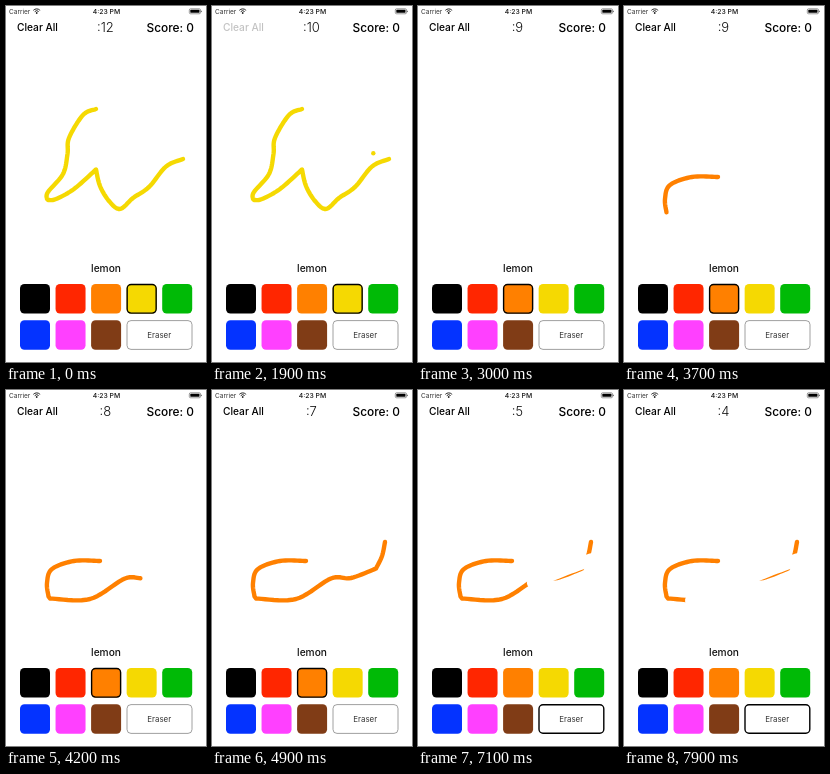
Animation, 200 px wide and 356 px high, one loop 8000 ms. Source, as an HTML page with a canvas:

```html
<!DOCTYPE html>
<html lang="en">
<head>
<meta charset="utf-8">
<title>Drawing game</title>
<style>
  html, body { margin: 0; width: 100%; height: 100%; overflow: hidden; background: #fff; }
  canvas { display: block; width: 100%; height: 100%; }
</style>
</head>
<body>
<canvas id="stage"></canvas>
<script>
const W = 200, H = 356, LOOP = 8000, STEP = 100;
const FONT = 'Inter, Roboto, sans-serif';
const ORANGE = '#ff8000', YELLOW = '#f5d902';
const SWATCHES = ['#000', '#ff2600', ORANGE, YELLOW, '#00ba06', '#0433ff', '#ff40ff', '#803c16'];

const canvas = document.getElementById('stage');
const ctx = canvas.getContext('2d');

// Smooth curve through a few points.
function smooth(points) {
  const out = [points[0]], last = points.length - 1;
  const at = k => points[Math.max(0, Math.min(last, k))];
  for (let i = 0; i < last; i++) {
    const [a, b, c, d] = [at(i - 1), at(i), at(i + 1), at(i + 2)];
    for (let n = 1; n <= 10; n++) {
      const f = n / 10;
      out.push([0, 1].map(k => b[k] + 0.5 * f * (c[k] - a[k] +
        f * (2 * a[k] - 5 * b[k] + 4 * c[k] - d[k] +
        f * (3 * (b[k] - c[k]) + d[k] - a[k])))));
    }
  }
  return out;
}

// Each argument is one smooth piece; pieces meet in corners.
function makeLine(...pieces) {
  const points = pieces.flatMap(smooth);
  const path = new Path2D();
  let length = 0;
  points.forEach(([x, y], i) => {
    path.lineTo(x, y);
    if (i) length += Math.hypot(x - points[i - 1][0], y - points[i - 1][1]);
  });
  return { path, length };
}

const yellowLine = makeLine(
  [[90, 103], [77, 109], [63, 132], [61.5, 148], [57, 168], [42, 186], [41, 193]],
  [[42, 194], [50, 193], [68, 183], [90, 163.5]],
  [[90, 163.5], [94, 180], [103, 195], [114, 203], [127, 192], [143, 181], [160, 160.5], [177, 153]]
);
const orangeLine = makeLine(
  [[94, 171], [68, 171], [46, 179], [41, 193], [42.5, 206.5]],
  [[44, 208.5], [84, 209], [119, 188.5], [139, 188], [164, 178.5]],
  [[164, 178.5], [170, 166], [173, 152]]
);
const longWipe = makeLine([[173, 169.8], [139, 182.4], [87, 205]]);
const shortWipe = makeLine([[82, 208], [67.5, 210.5]]);

const progress = (t, from, to) => Math.max(0, Math.min(1, (t - from) / (to - from)));

function stroke(line, part, color, width) {
  if (part <= 0) return;
  ctx.strokeStyle = color;
  ctx.lineWidth = width;
  ctx.lineCap = ctx.lineJoin = 'round';
  if (part < 1) ctx.setLineDash([line.length * part, line.length * 2]);
  ctx.stroke(line.path);
  ctx.setLineDash([]);
}

function dot(x, y, r, color) {
  ctx.beginPath();
  ctx.arc(x, y, r, 0, Math.PI * 2);
  ctx.fillStyle = color;
  ctx.fill();
}

function text(str, x, y, size, { weight = 400, align = 'left', color = '#000', alpha = 1 } = {}) {
  ctx.font = `${weight} ${size}px ${FONT}`;
  ctx.textAlign = align;
  ctx.fillStyle = color;
  ctx.globalAlpha = alpha;
  ctx.fillText(str, x, y);
  ctx.globalAlpha = 1;
}

function box(x, y, w, h, r, fill, line, width) {
  ctx.beginPath();
  ctx.roundRect(x, y, w, h, r);
  if (fill) { ctx.fillStyle = fill; ctx.fill(); }
  if (line) { ctx.strokeStyle = line; ctx.lineWidth = width; ctx.stroke(); }
}

// Button label opacity: dims when pressed, then fades back.
const pressFade = (t, at) => t < at ? 1 : 0.24 + 0.76 * progress(t, at + 100, at + 400);

function statusBar() {
  text('Carrier', 3, 7.8, 6.5, { color: '#333' });
  ctx.strokeStyle = '#222';
  ctx.lineWidth = 1;
  ctx.lineCap = 'butt';
  for (const r of [2.7, 4.6]) {
    ctx.beginPath();
    ctx.arc(30.7, 7.5, r, -Math.PI * 0.76, -Math.PI * 0.24);
    ctx.stroke();
  }
  dot(30.7, 7, 0.9, '#222');
  text('4:23 PM', 100.5, 7.8, 6.8, { weight: 500, align: 'center', color: '#111' });
  box(183.3, 2.8, 11.2, 5, 1.3, null, '#555', 0.6);
  box(184.3, 3.8, 9.2, 3, 0.6, '#000');
  box(195.1, 4.5, 0.8, 1.7, 0.4, '#555');
}

function header(t) {
  text('Clear All', 11, 25, 10.2, { weight: 550, alpha: pressFade(t, 1900) });
  const seconds = 12 - Math.floor((t + 100) / 1000);
  text(':' + seconds, 99.4, 26, 13, { weight: 350, align: 'center', color: '#111' });
  text('Score: 0', 188, 25.5, 11.9, { weight: 550, align: 'right' });
}

function drawing(t) {
  if (t < 2000) {
    stroke(yellowLine, 1, YELLOW, 4.4);
    if (t >= 1200) dot(161.3, 147.2, 2.2, YELLOW);
    return;
  }
  const drawn = 0.33 * progress(t, 3200, 3700) + 0.67 * progress(t, 3700, 4500);
  stroke(orangeLine, drawn, ORANGE, 4.4);
  stroke(longWipe, progress(t, 6900, 7200), '#fff', 13);
  stroke(shortWipe, progress(t, 7400, 7600), '#fff', 13);
}

function palette(t) {
  text('lemon', 100, 265.6, 10.2, { weight: 550, align: 'center', color: '#111' });
  const erasing = t >= 6500;
  const chosen = erasing ? -1 : t < 3000 ? 3 : 2;
  SWATCHES.forEach((color, i) => {
    const x = 14 + 35.55 * (i % 5), y = i < 5 ? 278 : 314.2;
    box(x, y, 30, 29.6, 4.5, color);
    if (i === chosen) box(x + 0.5, y + 0.5, 29, 28.6, 4, null, '#000', 1.4);
  });
  if (erasing) box(121, 314.7, 64.8, 28.6, 4, '#fff', '#000', 1.4);
  else box(121, 314.6, 65, 28.8, 4, '#fff', '#888', 0.8);
  text('Eraser', 153.2, 331.8, 7.9, { align: 'center', color: '#333', alpha: pressFade(t, 6400) });
}

function render(t) {
  const scale = window.devicePixelRatio || 1;
  const w = Math.round(innerWidth * scale), h = Math.round(innerHeight * scale);
  if (canvas.width !== w || canvas.height !== h) {
    canvas.width = w;
    canvas.height = h;
  }
  ctx.setTransform(w / W, 0, 0, h / H, 0, 0);
  ctx.fillStyle = '#fff';
  ctx.fillRect(0, 0, W, H);
  drawing(t);
  statusBar();
  header(t);
  palette(t);
}

let start;
function tick(now) {
  start ??= now;
  render(Math.floor(((now - start) % LOOP) / STEP) * STEP);
  requestAnimationFrame(tick);
}
requestAnimationFrame(tick);
</script>
</body>
</html>
```
